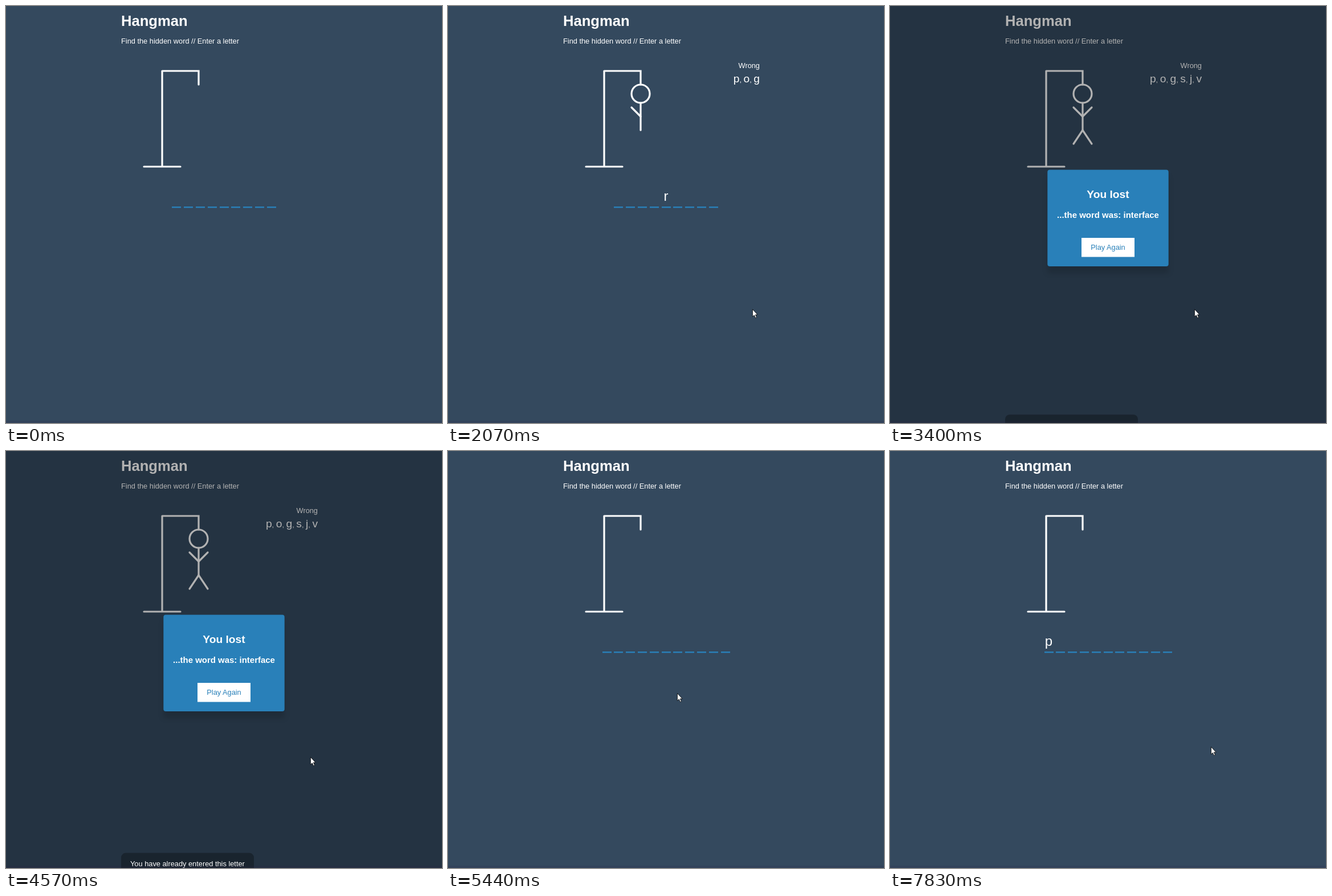
Write an HTML page that moves like this. It is 765 px wide and 732 px high and loops after 7990 ms.

```html
<!DOCTYPE html>
<html lang="en">
<head>
<meta charset="utf-8">
<title>Hangman</title>
<style>
html, body { margin: 0; width: 100%; height: 100%; overflow: hidden; background: #34495e; }
svg { display: block; font: 12.8px "Liberation Sans", Arial, sans-serif; fill: #fff; }
.lines { fill: none; stroke: #fff; stroke-width: 3.2; stroke-linecap: round; }
.bold { font-weight: bold; }
.mid { text-anchor: middle; }
.end { text-anchor: end; }
#panel { filter: drop-shadow(0 12px 5px rgba(0, 0, 0, .14)); }
</style>
</head>
<body>
<svg width="765" height="732" viewBox="0 0 765 732">
  <rect width="765" height="732" fill="#34495e"/>
  <text class="bold" x="202" y="35" font-size="25.6">Hangman</text>
  <text x="202" y="66">Find the hidden word // Enter a letter</text>
  <g class="lines" transform="translate(226 98) scale(.8)" style="stroke-width:4">
    <path d="M60 20H140V50M60 20V230M20 230H100"/>
    <g id="man">
      <circle cx="140" cy="70" r="20"/>
      <path d="M140 90V150"/>
      <path d="M140 120L120 100"/>
      <path d="M140 120L160 100"/>
      <path d="M140 150L120 180"/>
      <path d="M140 150L160 180"/>
    </g>
  </g>
  <text id="label" class="end" x="547" y="109">Wrong</text>
  <text id="wrong" class="end" x="547" y="134"></text>
  <g id="word" class="mid" font-size="24"></g>
  <g id="popup">
    <rect width="765" height="732" opacity=".3" fill="#000"/>
    <rect id="panel" x="276.3" y="287.5" width="212.4" height="169.5" rx="4" fill="#2980b9"/>
    <g class="mid">
      <text class="bold" x="382.5" y="337" font-size="19.2">You lost</text>
      <text class="bold" x="382.5" y="371.5" font-size="14.98">...the word was: interface</text>
      <g id="button">
        <rect x="336" y="407" width="93" height="33.5"/>
        <text x="382.5" y="428" fill="#2980b9">Play Again</text>
      </g>
    </g>
  </g>
  <g id="note">
    <path d="M202 39V8a8 8 0 0 1 8-8H427a8 8 0 0 1 8 8V39z" fill="#000" opacity=".3"/>
    <text x="218" y="23.6">You have already entered this letter</text>
  </g>
  <rect y="728" width="765" height="4" fill="#281e46" opacity=".15"/>
  <circle id="halo" cx="401" cy="425" r="11" fill="#ff0" opacity=".5"/>
  <g id="cursor" stroke="#000" stroke-linejoin="round">
    <path id="arrow" stroke-width=".8" d="M.4 .4V13.4L3.3 10.7L5.4 15.4L7.5 14.5L5.4 9.9H9.2z"/>
    <path id="hand" d="M-1.5 10V1.3a1.4 1.4 0 0 1 2.8 0V6.5q2.4-1 2.7 .6q2.3-.7 2.5 .8q2.2-.3 2.2 1.4V13l-1.5 4.5H-.5L-4.6 11q-.8-1.5 .6-2q1.2 0 2.5 2z"/>
  </g>
</svg>
<script>
const LOOP = 7990, LOST = 3400, RESET = 5440;
const $ = id => document.getElementById(id);
const show = (el, on) => el.setAttribute("visibility", on ? "inherit" : "hidden");

const misses = [["p", 1360], ["o", 1590], ["g", 2070], ["s", 2700], ["j", 2780], ["v", LOST]];
const rounds = [
  { size: 9, from: 0, hits: [["r", 4, 1680], ["a", 6, 2390], ["f", 5, 3010]] },
  { size: 11, from: RESET, hits: [["p", 0, 7830]] }
];
// Pointer moves: start time, time per step, points
const moves = [
  [500, 80, [[683, 720], [612, 632], [545, 548], [524, 522], [534, 532]]],
  [4500, 77, [[534, 537], [530, 530], [505, 508], [470, 477], [440, 452], [418, 436], [405, 428], [401, 425]]],
  [RESET, 80, [[402, 425]]],
  [5600, 80, [[430, 441], [490, 480], [545, 510], [563, 519]]]
];

function drawWord(t) {
  const { size, hits } = rounds[t < RESET ? 0 : 1];
  const left = i => 382.5 + (i - size / 2) * 20.8 + 2.4;
  let out = "";
  for (let i = 0; i < size; i++)
    out += `<rect x="${Math.round(left(i))}" y="352" width="16" height="2.4" fill="#2980b9"/>`;
  for (const [ch, i, at] of hits)
    if (t >= at) out += `<text x="${left(i) + 8}" y="342">${ch}</text>`;
  $("word").innerHTML = out;
}

function drawMisses(t) {
  const seen = t < RESET ? misses.filter(m => t >= m[1]) : [];
  $("wrong").innerHTML = seen.map(m => `<tspan font-size="19.2">${m[0]}</tspan>`).join(", ");
  show($("label"), seen.length);
  [...$("man").children].forEach((part, i) => show(part, i < seen.length));
}

const ease = x => { x = Math.min(1, Math.max(0, x)); return x * x * (3 - 2 * x); };
const hold = (t, from) => from + Math.floor((t - from) / 80) * 80;

function drawNote(t) {
  const rise = t < 5200
    ? ease((hold(t, LOST) - 3207) / 300)
    : 1 - ease((hold(t, 5200) - 5165) / 300);
  show($("note"), t >= LOST && t < RESET);
  $("note").setAttribute("transform", `translate(0 ${745.6 - 40 * rise})`);
}

function drawPointer(t) {
  const move = moves.filter(m => t >= m[0]).pop();
  show($("cursor"), move);
  if (!move) return;
  const [from, step, pts] = move;
  const [x, y] = pts[Math.min(pts.length - 1, Math.floor((t - from) / step))];
  const over = t >= LOST && t < RESET && x > 336 && x < 429 && y > 407 && y < 440;
  $("cursor").setAttribute("transform", `translate(${x} ${y})`);
  $("arrow").style.display = over ? "none" : "";
  $("hand").style.display = over ? "" : "none";
}

function draw(now) {
  const t = now % LOOP, pressed = t >= 5200 && t < RESET;
  drawWord(t);
  drawMisses(t);
  drawNote(t);
  drawPointer(t);
  show($("popup"), t >= LOST && t < RESET);
  show($("halo"), pressed);
  $("button").setAttribute("transform",
    pressed ? "translate(382.5 423.7) scale(.98) translate(-382.5 -423.7)" : "");
}

const start = performance.now();
function tick() {
  draw(performance.now() - start);
  requestAnimationFrame(tick);
}
tick();
</script>
</body>
</html>
```
